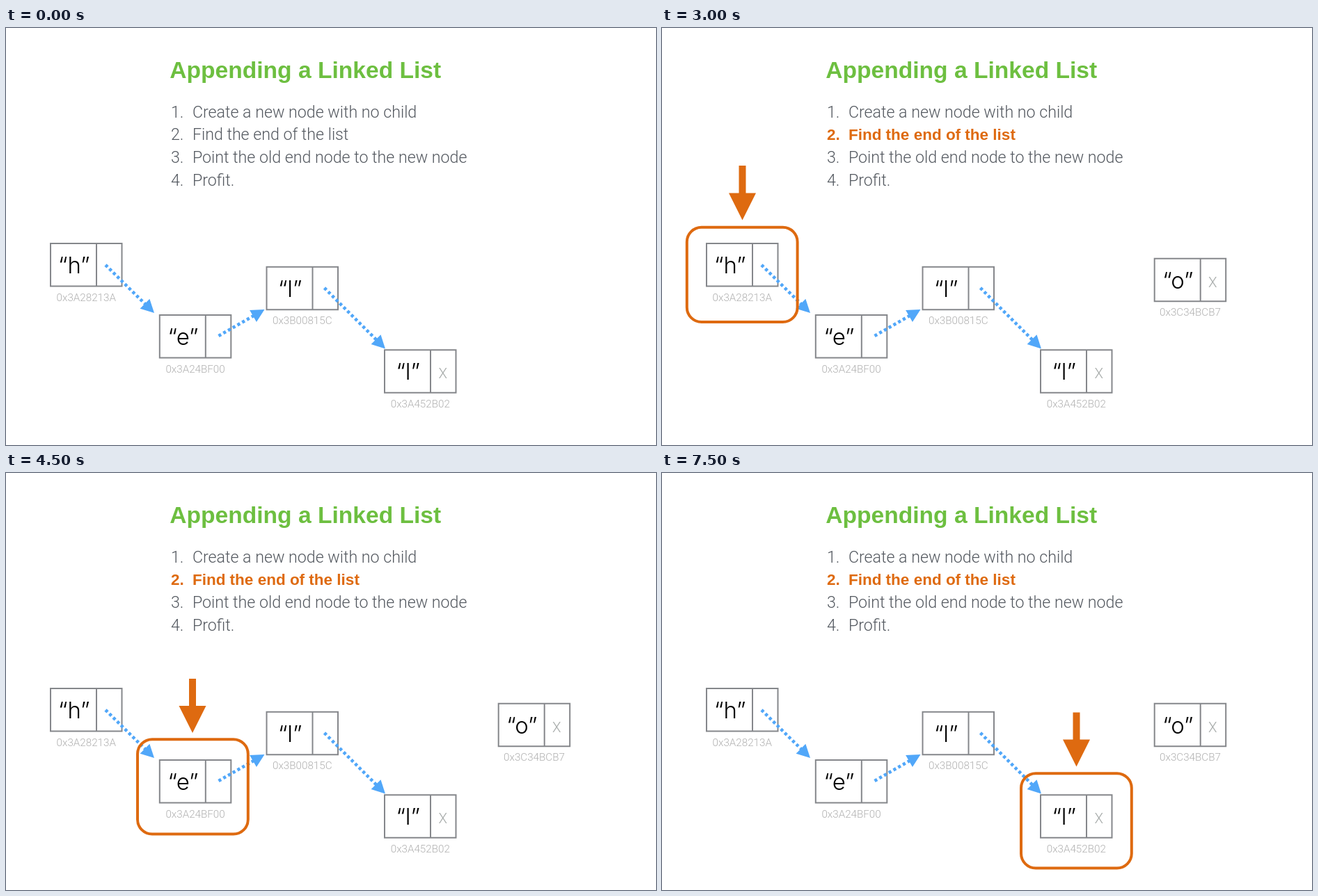
Recreate the animation shown at these times as an HTML page. Size 934 px wide and 600 px high, loop 8000 ms.

```html
<!DOCTYPE html>
<html lang="en">
<head>
<meta charset="utf-8">
<title>Appending a Linked List</title>
<style>
  html, body { margin: 0; width: 100%; height: 100%; overflow: hidden; background: #fff; }
  svg { display: block; width: 934px; height: 600px; }
  text { font-family: Roboto, Inter, sans-serif; font-weight: 300; white-space: pre; }
  .title { font: bold 33.6px "Liberation Sans", Arial, sans-serif; fill: #6dbf40; }
  .step { font-size: 23.2px; fill: #53585f; }
  .step.on { font: bold 22.5px "Liberation Sans", Arial, sans-serif; fill: #de6a10; }
  .letter { font-family: Inter, sans-serif; font-size: 33px; fill: #000; text-anchor: middle; }
  .address { font-size: 15.2px; fill: #b0b0b0; text-anchor: middle; }
  .end { font-size: 20.5px; fill: #a6aaa9; text-anchor: middle; }
  .box { fill: none; stroke: #85878b; stroke-width: 2; }
  .link { stroke: #51a7f9; stroke-width: 4.6; stroke-dasharray: 4.2 3.6; }
  .head { fill: #51a7f9; }
  .ring { fill: none; stroke: #de6a10; stroke-width: 4; }
  .pointer { fill: #de6a10; }
</style>
</head>
<body>
<svg id="stage" viewBox="0 0 934 600"></svg>
<script>
const NS = "http://www.w3.org/2000/svg";
const stage = document.getElementById("stage");
const LOOP = 8000;
const HOLD = 1500;

const steps = [
  "Create a new node with no child",
  "Find the end of the list",
  "Point the old end node to the new node",
  "Profit."
];

const nodes = [
  { x: 63, y: 309, letter: "h", address: "0x3A28213A" },
  { x: 219.8, y: 412, letter: "e", address: "0x3A24BF00" },
  { x: 373.5, y: 342.7, letter: "l", address: "0x3B00815C" },
  { x: 543, y: 462.2, letter: "l", address: "0x3A452B02", end: true },
  { x: 706.7, y: 330.8, letter: "o", address: "0x3C34BCB7", end: true }
];

const links = [
  [143, 341, 213, 410],
  [305.5, 443, 371.5, 405],
  [457.5, 374, 545, 461.5]
];

// One entry per scene: active step, ring corner, pointer axis, top and tip
const scenes = [
  { step: -1 },
  { step: 0, ring: [677.5, 304], pointer: [759.5, 135, 295.5] },
  { step: 1, ring: [33.8, 284.7], pointer: [115.5, 198, 276.5] },
  { step: 1, ring: [187, 381.2], pointer: [268, 296, 374] },
  { step: 1, ring: [344.7, 314], pointer: [426, 228.5, 306.5] },
  { step: 1, ring: [514, 430.2], pointer: [595.5, 344.5, 422.5] }
];

function add(tag, attrs, text, parent = stage) {
  const el = document.createElementNS(NS, tag);
  for (const key in attrs) el.setAttribute(key, attrs[key]);
  if (text) el.textContent = text;
  return parent.appendChild(el);
}

function addNode({ x, y, letter, address, end }) {
  const g = add("g", { transform: `translate(${x} ${y})` });
  add("path", { class: "box", d: "M1 1H103.5V62.5H1ZM67 1V62.5" }, "", g);
  add("text", { class: "letter", x: 34.7, y: 44 }, `“${letter}”`, g);
  add("text", { class: "address", x: 52.3, y: 83.7 }, address, g);
  if (end) add("text", { class: "end", x: 84.7, y: 42 }, "X", g);
  return g;
}

function addLink([x1, y1, x2, y2]) {
  const length = Math.hypot(x2 - x1, y2 - y1);
  const angle = Math.atan2(y2 - y1, x2 - x1) * 180 / Math.PI;
  const g = add("g", { transform: `translate(${x1} ${y1}) rotate(${angle})` });
  add("line", { class: "link", x2: length - 18 }, "", g);
  add("path", { class: "head", d: `M${length} 0l-19 -9.8v19.6Z` }, "", g);
}

function addScene({ ring, pointer }) {
  const g = add("g", {});
  if (!ring) return g;
  const [x, y] = ring;
  const [px, top, tip] = pointer;
  add("rect", { class: "ring", x: x + 2, y: y + 2, width: 158.8, height: 136.4, rx: 21 }, "", g);
  add("path", { class: "pointer", d: `M${px - 5} ${top}h10V${tip - 39}h14.5L${px} ${tip}l-19.5 -39h14.5Z` }, "", g);
  return g;
}

add("text", { class: "title", x: 235.3, y: 71.5 }, "Appending a Linked List");
const rows = steps.map((label, i) => {
  const g = add("g", { transform: `translate(0 ${128.7 + i * 32.7})` });
  return [add("text", { x: 237, y: 0 }, `${i + 1}.`, g), add("text", { x: 267.9, y: 0 }, label, g)];
});
const cells = nodes.map(addNode);
links.forEach(addLink);
const marks = scenes.map(addScene);

const show = (el, on) => el.setAttribute("visibility", on ? "visible" : "hidden");

function draw(time) {
  const now = Math.floor((time % LOOP) / HOLD);
  rows.forEach((row, i) => row.forEach(el =>
    el.setAttribute("class", i === scenes[now].step ? "step on" : "step")));
  show(cells[4], now > 0);
  marks.forEach((mark, i) => show(mark, i === now));
}

function tick() {
  draw(performance.now());
  requestAnimationFrame(tick);
}
tick();
</script>
</body>
</html>
```
